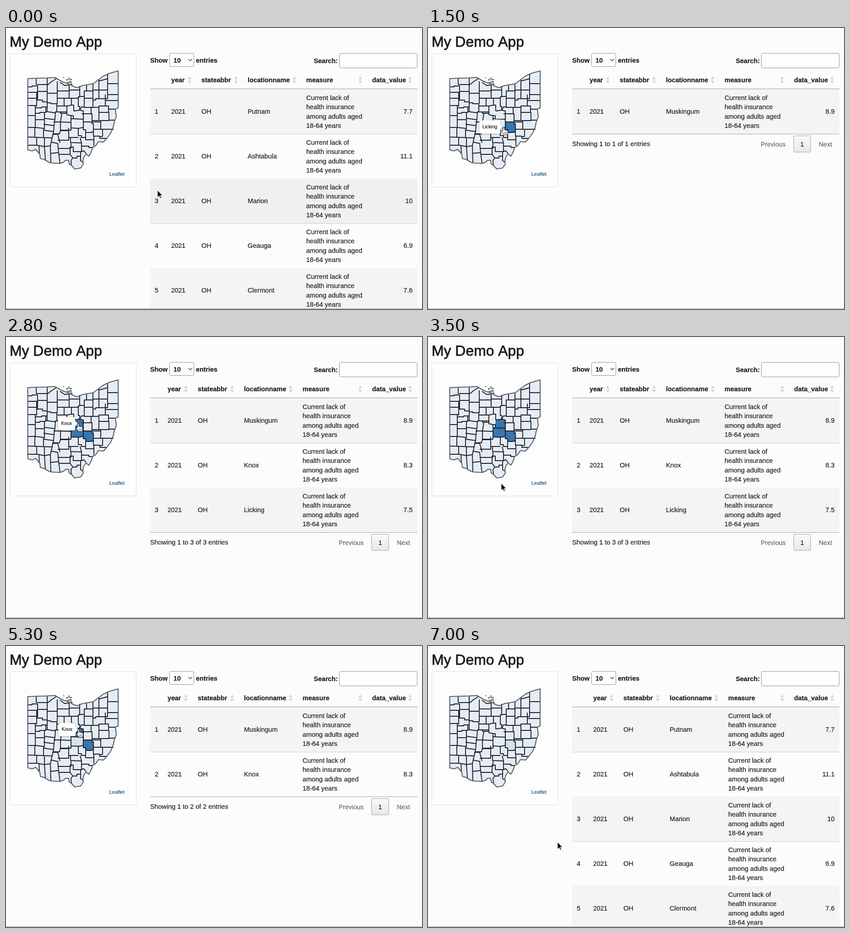
Write an HTML page that moves like this. It is 909x616 px and loops after 7.1 s.

```html
<!DOCTYPE html>
<html lang="en">
<head>
<meta charset="utf-8">
<title>My Demo App</title>
<style>
  html, body { margin: 0; width: 100%; height: 100%; overflow: hidden; background: #fcfcfc; }
  svg { display: block; width: 909px; height: 616px; font: 14.4px "Liberation Sans", Arial, sans-serif; fill: #1c1c1c; }
  text { stroke: currentColor; stroke-width: .2px; color: #1c1c1c; }
  .bold { font-weight: bold; font-size: 14.3px; }
  .title { font-size: 31.9px; stroke-width: .8px; font-kerning: none; }
  .box { fill: #fdfdfd; stroke: #8f8f8f; }
  .border { fill: none; stroke: #1b2025; stroke-width: 1.9; stroke-linejoin: round; }
  .coast { fill: none; stroke: #5c6065; stroke-width: 2.1; stroke-linejoin: round; }
  .muted { fill: #666; color: #666; font-size: 14px; }
  .small { font-size: 10.4px; fill: #111; }
  .link { font-size: 11px; fill: #125688; color: #125688; }
</style>
</head>
<body>
<svg viewBox="0 0 909 616">
  <defs>
    <linearGradient id="button" x2="0" y2="1"><stop stop-color="#fafafa"/><stop offset="1" stop-color="#e8e8e8"/></linearGradient>
    <filter id="shadow" x="-30%" y="-40%" width="160%" height="190%"><feDropShadow dx="0" dy="1" stdDeviation="1.4" flood-opacity=".35"/></filter>
    <path id="state" d="M47.5 111L57 110.5 89 109.5 107 108.5 111 111 118 115 126 119 133 121 139 123 147 128 155 131 168 126
      180 124 191 122 200 115 212 106 224 100 245 94V175L239 178 241 194 236 208 235 215 229 230 221 241
      213 250 202 249 196 258 189 262 188 267 184 276 181 281 175 276 170 283 168 291 169 298 163 307 150 309
      143 301 138 298 137 290 130 290 126 294 118 297 101 296 95 295 83 288 75 286 74 277 70 272 65 266 57 269.5 47.5 267Z"/>
  </defs>

  <text class="title" x="8" y="41">My Demo App</text>
  <rect x="8.5" y="56.5" width="276" height="292" rx="4" fill="#fdfdfd" stroke="#ddd"/>

  <use href="#state" fill="#e6ecf5"/>
  <path data-county="Licking" d="M142 199L169 200V218L158 220 142 219Z"/>
  <path data-county="Knox" d="M148 182L161 180 169 182V200L147 199V192Z"/>
  <path data-county="Muskingum" d="M169 206H188V210H191V227L186 229H174V223H169Z"/>
  <g class="border">
    <!-- northwest -->
    <path d="M66 111V124M90 110V183M47.5 129H57V127H69V157M66 124H92L99 118 110 111M69 139H90M47.5 141H69M67 141V172
      M47.5 154H67M67 158H80V162H90M90 143H112M112 117V166M90 164H98V166H112M47.5 170H67M64 170V218M64 175H78V173H90"/>
    <!-- west -->
    <path d="M47.5 192H64M64 187H74V185H87V174M84 186V222M65 201H84M87 183L108 186 107 199 105 214 104 227 101 240 97 258
      M84 198L107 201M82 211L105 214M47.5 218H64L82 220M82 224L104 227M63 218V240M82 220V240M47.5 239L102 241"/>
    <!-- southwest -->
    <path d="M67 240V257M47.5 257H68L84 260 97 258M84 240V260L86 289M72 257L73 276M97 258L98 296M98 250L113 253 115 273 118 297
      M97 275L115 273M101 233H113L118 252"/>
    <!-- north centre -->
    <path d="M118 119L128 126 138 125V154M112 138H138M138 136H161M112 154H158M112 171H133L143 169M127 154V171M143 154V169H148V182
      M158 154V151H161V127M158 154V172H161V180M161 150H171V154M176 125V138H171V174M176 138H190M171 154H190M111 166V184H133V171"/>
    <!-- centre -->
    <path d="M107 184H119V187H133M133 184V190L142 192H147M122 187L119 207 119 225M104 206H119L142 207M142 192V224H119L117 232H104
      M148 182L161 180 169 182V200L147 199V192M142 199H147M169 200V218L158 220 142 219M161 180L165 173H171V174H187M165 188H188"/>
    <!-- northeast -->
    <path d="M190 122V174M190 136H203V155M203 113V136H222M203 116L212 114 222 111M222 101V146M222 122H245M222 146H245M217 146V159H245
      M190 158H196V155H222V146M217 159V171H203V174H187M218 171H224V178H239M224 178V185H203M203 174V203"/>
    <!-- east -->
    <path d="M186 174V188H188V206M169 188V206M169 206H207V203H188M203 203H225V185M225 202H238M207 203V222H235M188 206V210H191V227
      M191 222H211V238M191 227L186 229H174V223H169V206M211 238H205V242H221M191 227V237H205"/>
    <!-- south centre -->
    <path d="M158 220V236H165V240H174V229M174 240V245H192V237M119 225H137V219M137 225V240H158M113 246H137V240M141 240V251L165 252
      162 240M142 251V264M113 264H140V261H147V271H165V252M165 259H181V262H189M192 245V258"/>
    <!-- south -->
    <path d="M115 277H140V264M140 277L146 285 142 290 143 301M146 285H155V281H163V271M163 281V291L168 294M165 271L170 269 175 275"/>
  </g>
  <use href="#state" class="coast"/>
  <path d="M125 109h2M131 114l5-1M136 111l3-2M138 113h6M139 117l5 2M133 120l9-2M141 122l4 2" fill="none" stroke="#65696d" stroke-width="2.6"/>
  <text class="link" x="226" y="324">Leaflet</text>

  <g class="bold">
    <text x="315" y="75.5">Show</text>
    <rect class="box" x="357.5" y="55.5" width="53" height="29" rx="3"/>
    <text x="366" y="75.5">10</text>
    <path d="M398.5 68l4 4 4-4" fill="none" stroke="#444" stroke-width="1.3"/>
    <text x="415" y="75.5">entries</text>
    <text x="725" y="77" text-anchor="end">Search:</text>
    <rect class="box" x="728.5" y="55.5" width="170" height="32" rx="3"/>
  </g>
  <g id="table"></g>
  <path d="M0 615.5H909" stroke="#999"/>

  <g id="tip" filter="url(#shadow)">
    <path fill="#fff"/>
    <text class="small" y="3" text-anchor="middle"></text>
  </g>
  <g id="arrow">
    <path d="M1 1V16L4.4 12.8 6.8 18 9.2 17 6.9 12H11.6Z" opacity=".2"/>
    <path d="M0 0V15L3.4 11.8 5.8 17 8.2 16 5.9 11H10.6Z" fill="#000" stroke="#fff" stroke-width=".8"/>
  </g>
  <g id="hand" stroke="#111" stroke-linejoin="round">
    <path fill="#fff" d="M-2.5 8V-.5a1.6 1.6 0 0 1 3.2 0V5Q1 4 2.4 4.3T3.8 5.6Q4.5 4.7 5.8 5.2T7 6.6Q8.8 6 9 8V11Q9 13 7.8 15.5H-.2Q-1.2 13-3.4 10.8L-5.4 8.4Q-5.8 6.6-4.2 6.6-3.2 6.8-2.5 8Z"/>
    <path d="M1.6 9.5v3.5M3.9 9.5v3.5M6.2 9.5v3.5" fill="none" stroke-width=".8"/>
  </g>
</svg>
<script>
const LOOP = 7100, STEP = 100;
const $ = selector => document.querySelector(selector);
const table = $('#table'), tip = $('#tip'), arrow = $('#arrow'), hand = $('#hand');

// Pointer stops: time, x, y, hovered county. Straight motion in between.
const pointer = [
  [0, 331, 356], [100, 326, 352], [200, 309, 338], [400, 258, 292], [500, 232, 268],
  [600, 210, 244, 'Washington'], [700, 195, 229, 'Noble'], [800, 185, 220, 'Muskingum'],
  [1000, 179.5, 217, 'Muskingum'], [1300, 179, 217, 'Muskingum'], [1400, 173, 218, 'Muskingum'],
  [1500, 164, 218, 'Licking'], [1700, 160, 214, 'Licking'], [2000, 160, 213, 'Licking'],
  [2100, 159, 206, 'Licking'], [2200, 158, 200, 'Licking'], [2300, 158, 196.5, 'Knox'],
  [2500, 157, 191, 'Knox'], [2800, 157, 191, 'Knox'], [2900, 163, 197, 'Knox'],
  [3000, 168, 204, 'Licking'], [3100, 168, 204, 'Licking'], [3200, 166, 222, 'Perry'],
  [3300, 160, 256, 'Vinton'], [3400, 156, 298, 'Lawrence'], [3500, 160, 321], [3800, 160, 322],
  [3900, 162, 318], [4000, 164, 302, 'Lawrence'], [4100, 164, 282, 'Gallia'],
  [4200, 163, 263, 'Vinton'], [4300, 162, 246, 'Hocking'], [4400, 160, 231, 'Perry'],
  [4500, 158, 222, 'Perry'], [4600, 156, 215, 'Licking'], [4700, 153.5, 205, 'Licking'],
  [5100, 153.5, 204, 'Licking'], [5200, 156, 194, 'Knox'], [5300, 158, 184, 'Knox'],
  [5700, 158, 184, 'Knox'], [5800, 165, 194, 'Knox'], [5900, 174.5, 207, 'Muskingum'],
  [6000, 180.5, 211, 'Muskingum'], [6100, 181, 213, 'Muskingum'], [6500, 182.5, 214, 'Muskingum'],
  [6700, 182.5, 214, 'Muskingum'], [6800, 205, 246, 'Washington'], [6900, 255, 375], [7000, 283, 430]
];

// Time spans in which a county is selected, then when its pale trace ends.
const selected = { Muskingum: [1200, 6700, LOOP], Licking: [1900, 5000, 5700], Knox: [2700, 5700, 6700] };

const all = [['Putnam', '7.7'], ['Ashtabula', '11.1'], ['Marion', '10'], ['Geauga', '6.9'], ['Clermont', '7.6']];
const muskingum = ['Muskingum', '8.9'], knox = ['Knox', '8.3'], licking = ['Licking', '7.5'];
const tables = [
  [0, all], [1300, [muskingum]], [2000, [muskingum, licking]], [2800, [muskingum, knox, licking]],
  [5100, [muskingum, knox]], [5800, [muskingum]], [6800, all]
];

const measure = ['Current lack of', 'health insurance', 'among adults aged', '18-64 years'];
const text = (x, y, value, extra = '') => `<text x="${x}" y="${y}" ${extra}>${value}</text>`;
const line = (y, color) => `<path d="M315 ${y}H899" stroke="${color}"/>`;
const sorter = x => `<path d="M${x - 4} 112.5l4-6.5 4 6.5ZM${x - 4} 115.5l4 6.5 4-6.5Z" fill="#d3d3d3"/>`;

function tableMarkup(rows, hovered) {
  const full = rows === all, dx = full ? 8 : 0;
  const columns = [['year', 353 + dx, 393 + dx], ['stateabbr', 419 + dx, 494 + dx],
    ['locationname', 520 + dx, 622 + dx], ['measure', 648 + dx, 774], ['data_value', 800, 883]];
  let out = columns.map(([name, x, icon]) => text(x, 118.5, name, 'class="bold"') + sorter(icon)).join('');
  rows.forEach(([place, value], i) => {
    const top = 134 + 98 * i, base = top + 54.3;
    if (i % 2 === 0) out += `<rect x="315" y="${top}" width="584" height="98" fill="${i === hovered ? '#f0f0f0' : '#f4f4f4'}"/>`;
    out += text(329, base, i + 1, 'text-anchor="middle"') + text(353 + dx, base, 2021, 'font-size="14"') +
      text(419 + dx, base, 'OH') + text(520 + dx, base, place) +
      measure.map((words, n) => text(648 + dx, top + 24 + 20.3 * n, words)).join('') +
      text(888.5, base, value, 'text-anchor="end"') + line(top + 98.5, '#ccc');
  });
  out += line(133.5, '#999');
  if (full) return out;
  const n = rows.length, end = 134 + 98 * n;
  return out + line(end + .5, '#a5a5a5') + text(315, end + 26.5, `Showing 1 to ${n} of ${n} entries`) +
    text(727, end + 27.5, 'Previous', 'class="muted"') +
    `<rect x="799" y="${end + 4.5}" width="37" height="35.5" rx="2" fill="url(#button)" stroke="#a0a0a0"/>` +
    text(817.5, end + 27.5, 1, 'text-anchor="middle"') + text(854, end + 27.5, 'Next', 'class="muted"');
}

const latest = (list, t) => list.findLast(item => item[0] <= t);

function pointerAt(t) {
  const from = latest(pointer, t), to = pointer[pointer.indexOf(from) + 1] || from;
  const k = to === from ? 0 : (t - from[0]) / (to[0] - from[0]);
  return { x: from[1] + (to[1] - from[1]) * k, y: from[2] + (to[2] - from[2]) * k, county: from[3] };
}

const show = (node, visible, x, y) => {
  node.style.display = visible ? '' : 'none';
  node.setAttribute('transform', `translate(${x} ${y})`);
};

function drawTip(label) {
  const words = tip.querySelector('text');
  words.textContent = label;
  const width = words.getComputedTextLength() + 13.5, left = -6 - width;
  words.setAttribute('x', left + width / 2);
  tip.querySelector('path').setAttribute('d',
    `M${left + 3}-14.5H-9q3 0 3 3V-6L0 0-6 6V11.5q0 3-3 3H${left + 3}q-3 0-3-3V-11.5q0-3 3-3Z`);
}

let drawnTable;
function render(t) {
  const { x, y, county } = pointerAt(t), rows = latest(tables, t)[1];
  const hovered = x >= 315 && y >= 134 ? Math.floor((y - 134) / 98) : -1;
  const markup = tableMarkup(rows, hovered);
  if (markup !== drawnTable) table.innerHTML = drawnTable = markup;

  document.querySelectorAll('[data-county]').forEach(path => {
    const [on, off, clear] = selected[path.dataset.county];
    path.setAttribute('fill', t < on || t >= clear ? '#e6ecf5' : t < off ? '#3975b0' : '#d4e1f0');
  });

  show(arrow, !county, x, y);
  show(hand, county, x + 1.5, y + .5);
  show(tip, county, x, y - 1);
  if (county) drawTip(county);
}

let start, drawnStep;
function tick(now) {
  start ??= now;
  const step = Math.floor((now - start) % LOOP / STEP);
  if (step !== drawnStep) render((drawnStep = step) * STEP);
  requestAnimationFrame(tick);
}
render(0);
requestAnimationFrame(tick);
</script>
</body>
</html>
```
